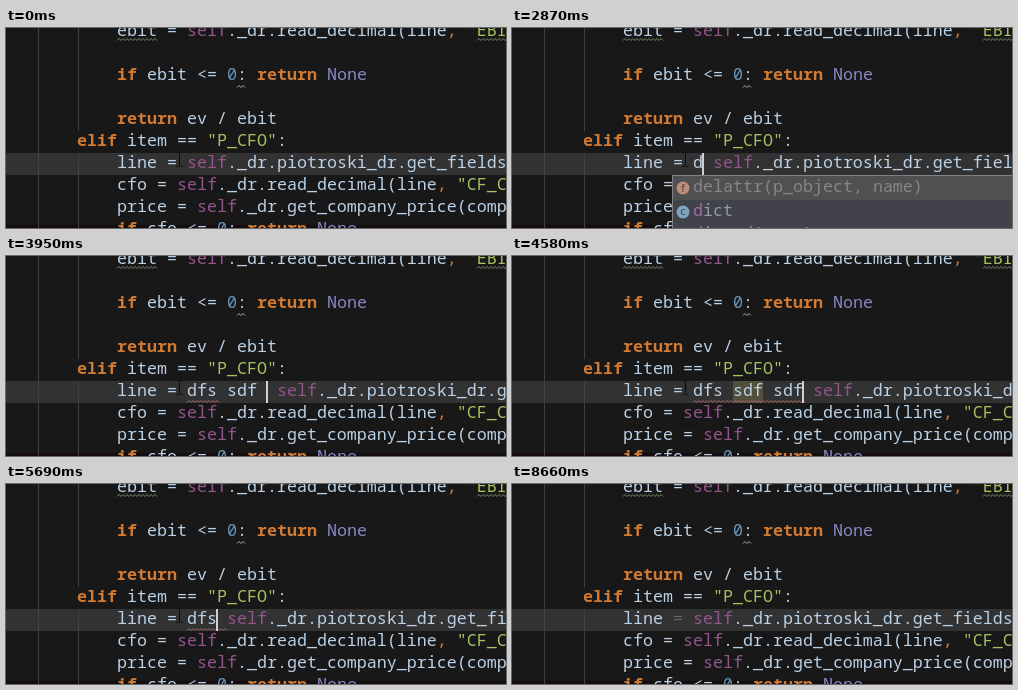
Write an HTML page that moves like this. It is 500 px wide and 200 px high and loops after 8980 ms.

```html
<!DOCTYPE html>
<html>
<head>
<meta charset="utf-8">
<style>
  html, body { margin: 0; width: 100%; height: 100%; overflow: hidden; background: #181818; }
  svg { display: block; }
  text { font: 16.667px "Noto Sans Mono", "DejaVu Sans Mono", monospace; white-space: pre; fill: #bad0e5; }
  .keyword { fill: #d07a34; font-weight: bold; }
  .comma { fill: #d07a34; }
  .self { fill: #94558d; }
  .none { fill: #8888c6; }
  .number { fill: #6897bb; }
  .string { fill: #a5c261; }
  .icon { font: 10px "DejaVu Sans", sans-serif; fill: #444; text-anchor: middle; }
</style>
</head>
<body>
<svg id="stage" width="500" height="200" viewBox="0 0 500 200">
  <rect y="197" width="500" height="3" fill="#150c10"/>
  <rect y="125" width="500" height="22" fill="#323232"/>
  <path d="M32.5 0V200M72.5 0V103M72.5 125V200" stroke="#404040"/>
  <rect id="warning" x="221" y="125" height="22" fill="#52503a"/>
  <g id="code"></g>
  <text id="edited" x="111" y="140"></text>
  <path id="errors" fill="none" stroke="#a8686a"/>
  <rect id="caret" y="125" width="2" height="22" fill="#d0d0d0"/>
  <g id="popup">
    <rect x="160.5" y="147.5" width="345" height="60" fill="#41424a" stroke="#808286"/>
    <rect x="161" y="148" width="339" height="24" fill="#4f5052"/>
    <circle cx="171" cy="160" r="6.5" fill="#c08d7c"/>
    <circle cx="171" cy="184" r="6.5" fill="#7da5c2"/>
    <text class="icon" x="171" y="164">f</text>
    <text class="icon" x="171" y="187">c</text>
    <text x="181" y="164" style="fill:#868686">delattr(p_object, name)</text>
    <text x="181" y="188" style="fill:#9298a8"><tspan fill="#9a70a0">d</tspan>ict</text>
    <text x="181" y="211" style="fill:#9298a8"><tspan fill="#9a70a0">d</tspan>ivmod(x, y)</text>
  </g>
  <path id="mouse" d="M-3 -7H-1L0 -6L1 -7H3M0 -6V6M-3 7H-1L0 6L1 7H3" fill="none" stroke="#0c0c0c"/>
</svg>
<script>
const LOOP = 8980, CELL = 10, LEFT = 111;
const $ = id => document.getElementById(id);

const paint = source => source.replace(/</g, '&lt;').replace(
  /(?<string>"[^"]*")|\b(?<keyword>if|elif|return)\b|\b(?<self>self)\b|\b(?<none>None)\b|\b(?<number>\d+)\b|(?<comma>,)/g,
  (token, ...rest) => {
    const groups = rest[rest.length - 1];
    const kind = Object.keys(groups).find(key => groups[key]);
    return `<tspan class="${kind}">${token}</tspan>`;
  });

const wave = (x, y, width) => width > 0 ? `M${x} ${y}` + 'l2 -2l2 2'.repeat(Math.ceil(width / 4)) : '';

const lines = [
  [111, 8, 'ebit = self._dr.read_decimal(line, "EBIT")'],
  [111, 52, 'if ebit <= 0: return None'],
  [111, 96, 'return ev / ebit'],
  [71, 118, 'elif item == "P_CFO":'],
  [111, 162, 'cfo = self._dr.read_decimal(line, "CF_CFO")'],
  [111, 184, 'price = self._dr.get_company_price(company)'],
  [111, 206, 'if cfo <= 0: return None']
];
$('code').innerHTML = lines.map(([x, y, s]) => `<text x="${x}" y="${y}">${paint(s)}</text>`).join('') +
  `<path d="${wave(111, 12.5, 40) + wave(471, 12.5, 30)}" fill="none" stroke="#75896a"/>` +
  `<path d="${wave(231, 59.5, 8)}" fill="none" stroke="#aaa"/>`;

// [start, inserted text, caret column (0 hides it, omitted follows the text)]
const steps = [
  [0, '', 0], [400, '', 7], [930, '', 0], [1240, ''], [2250, '', 0],
  [2560, ' '], [2870, ' d'], [3020, ' dfs'],
  [3340, ' dfs '], [3490, ' dfs s'], [3570, ' dfs sd'], [3650, ' dfs sdf'],
  [3950, ' dfs sdf '], [4100, ' dfs sdf s'], [4200, ' dfs sdf sd'], [4280, ' dfs sdf sdf']
];
for (let i = 0; i < 7; i++) steps.push([4660 + i * 143, ' dfs sdf sdf'.slice(0, 11 - i)]);
steps.push([5690, ' dfs'], [5840, ' df'], [6000, ' d'], [6160, ' '], [6480, ''], [7100, '', 0]);

const between = (t, from, to) => t >= from && t < to;
const show = (id, on) => $(id).setAttribute('visibility', on ? 'visible' : 'hidden');

function draw(t) {
  const [, typed, column = 6 + typed.length] = steps.findLast(step => step[0] <= t);
  const end = (typed.length - 1) * CELL;
  const dim = between(t, 7100, 7960) || t >= 8660;
  const sign = dim ? '<tspan fill="#666">=</tspan>' : '=';
  $('edited').innerHTML = 'line ' + sign + paint(typed + ' self._dr.piotroski_dr.get_fields(');

  show('caret', column);
  $('caret').setAttribute('x', LEFT + column * CELL - 1);

  const checked = between(t, 4580, 6160);
  const marked = checked ? Math.min(end + (end <= 30 ? CELL : 0), 110) : 30;
  $('errors').setAttribute('d', between(t, 3950, 6160) ? wave(181, 146.5, marked) : '');
  $('warning').setAttribute('width', checked ? Math.max(0, Math.min(30, end - 40)) : 0);

  show('popup', between(t, 2870, 3020));
  show('mouse', t < 8110);
  const [x, y] = t < 7960 ? [173.5, 131.5] : t < 8035 ? [225.5, 145.5] : [316.5, 164.5];
  $('mouse').setAttribute('transform', `translate(${x} ${y})`);
}

const start = performance.now();
let last = -1;
function tick() {
  const t = (performance.now() - start) % LOOP;
  const slot = Math.floor(t / 10);
  if (slot !== last) draw(t);
  last = slot;
  requestAnimationFrame(tick);
}
tick();
</script>
</body>
</html>
```
